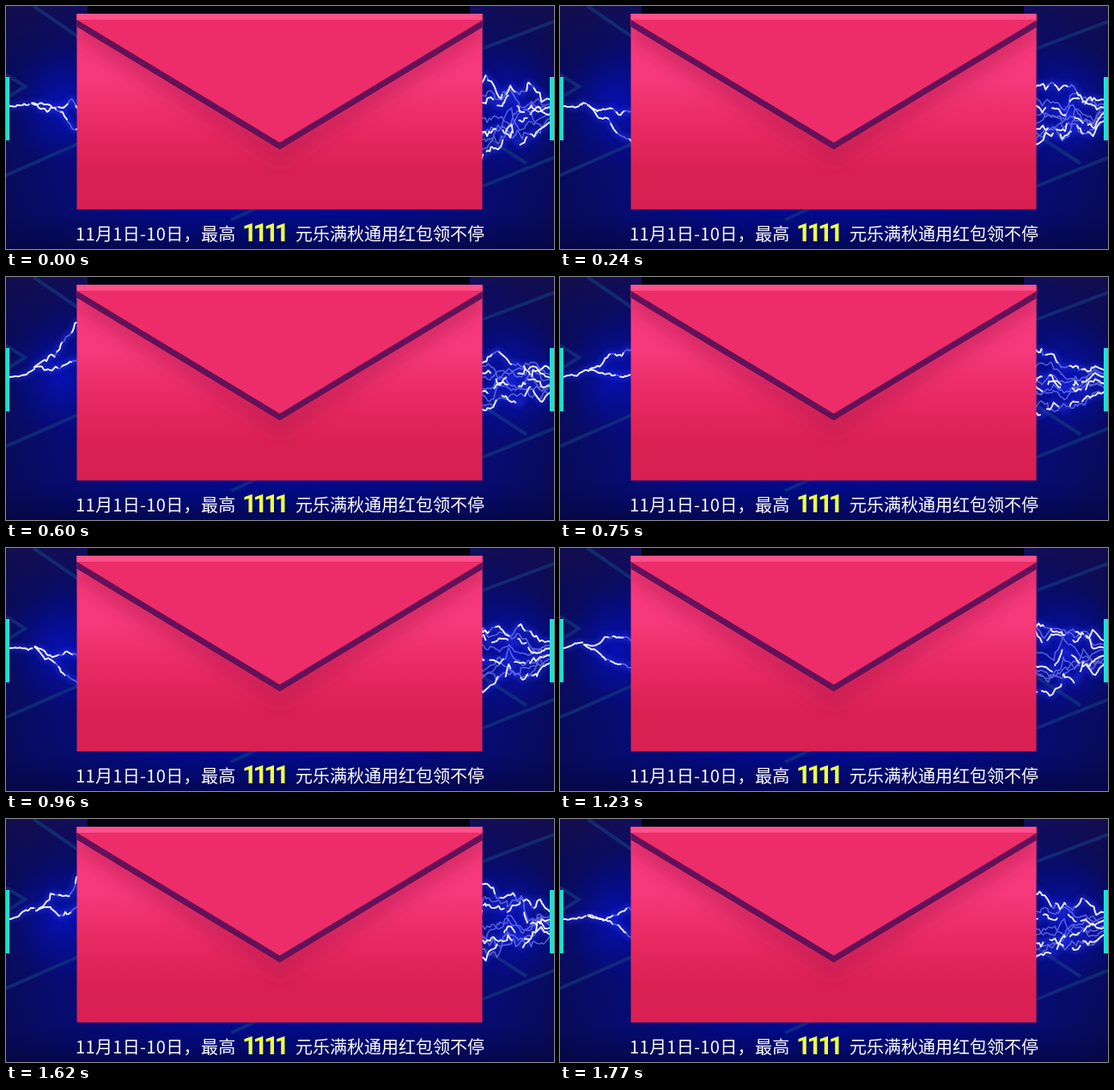
Animation, 638 px wide and 284 px high, one loop 1800 ms. Source, as an HTML page:

```html
<!DOCTYPE html>
<html lang="zh">
<head>
<meta charset="utf-8">
<style>
html, body { margin: 0; width: 100%; height: 100%; overflow: hidden; background: #070b45 }
svg { display: block; width: 638px; height: 284px }
text { font: 500 20px "Noto Sans CJK SC", "Noto Sans CJK", sans-serif; fill: #fff }
.date { letter-spacing: .35px }
.sum { font: 700 30px Roboto, sans-serif; letter-spacing: -4.6px; fill: #eeff46 }
.bolt path { fill: none; stroke-linejoin: round }
</style>
</head>
<body>
<svg viewBox="0 0 638 284">
  <defs>
    <radialGradient id="sky" gradientUnits="userSpaceOnUse" cx="319" cy="140" r="365">
      <stop stop-color="#00109c"/><stop offset=".45" stop-color="#020a8c"/>
      <stop offset=".72" stop-color="#070c72"/><stop offset="1" stop-color="#0a0b4c"/>
    </radialGradient>
    <linearGradient id="dusk" x2="0" y2="1">
      <stop stop-color="#1a1048" stop-opacity=".6"/><stop offset=".35" stop-color="#060650" stop-opacity="0"/>
      <stop offset=".85" stop-color="#030550" stop-opacity=".1"/><stop offset="1" stop-color="#040640" stop-opacity=".75"/>
    </linearGradient>
    <radialGradient id="halo">
      <stop stop-color="#0710b4"/><stop offset="1" stop-color="#050e90" stop-opacity="0"/>
    </radialGradient>
    <linearGradient id="body" x2="0" y2="1">
      <stop stop-color="#fb3e82"/><stop offset=".35" stop-color="#f43879"/>
      <stop offset=".58" stop-color="#e82a63"/><stop offset=".8" stop-color="#da2153"/>
      <stop offset="1" stop-color="#d82052"/>
    </linearGradient>
    <filter id="soft" x="-20%" y="-20%" width="140%" height="150%"><feGaussianBlur stdDeviation="9"/></filter>
    <filter id="glow" filterUnits="userSpaceOnUse" x="0" y="0" width="638" height="284"><feGaussianBlur stdDeviation="3"/></filter>
    <clipPath id="front"><path d="M82.5 9H554.6V237.7H82.5z"/></clipPath>
  </defs>
  <path fill="url(#sky)" d="M0 0H638V284H0z"/>
  <path fill="url(#dusk)" d="M0 0H638V284H0z"/>
  <ellipse cx="65" cy="118" rx="65" ry="75" fill="url(#halo)"/>
  <ellipse cx="590" cy="122" rx="70" ry="80" fill="url(#halo)"/>
  <path d="M32 0L84 36M0 80L22 94L0 108M0 198L84 161M262 250L292 236M554 50L638 18M554 211L638 177M554 150L606 184"
    fill="none" stroke="#143c80" stroke-width="4" opacity=".6"/>
  <g class="bolt">
    <path id="aura" stroke="#2a35f0" stroke-width="6" opacity=".55" filter="url(#glow)"/>
    <path id="rim" stroke="#8490ff" stroke-width="1.6" opacity=".6"/>
    <path id="core" stroke="#f4f5ff" stroke-width="1.8" stroke-dasharray="34 5 14 16 22 9"/>
  </g>
  <path fill="#1fdfd2" d="M0 83H4V157H0zM633 83H638V157H633z"/>
  <path fill="#02020c" d="M95 0H540V10H95z"/>
  <g clip-path="url(#front)">
    <path fill="url(#body)" d="M82 9H555V238H82z"/>
    <path d="M83 26L319 174L555 26" fill="none" stroke="#b81c50" stroke-width="22" opacity=".5" filter="url(#soft)"/>
    <path d="M75 15.7L318.7 163.7L563 15.7V9H75z" fill="#ec2d69"/>
    <path d="M75 15.7L318.7 163.7L563 15.7" fill="none" stroke="#631158" stroke-width="7"/>
    <path fill="#ff5089" d="M82 9H555V16H82z"/>
  </g>
  <text x="81" y="274" class="date">11月1日-10日，最高</text>
  <text x="275" y="274.5" class="sum">1111</text>
  <text x="337" y="274">元乐满秋通用红包领不停</text>
</svg>
<script>
const LOOP = 1800, STEP = 30, BEAT = 90;

const mix = (a, b, k) => a + (b - a) * k;
const hash = (a, b, c) => {
  const v = Math.sin(a * 127.1 + b * 311.7 + c * 74.7) * 43758.5453;
  return (v - Math.floor(v)) * 2 - 1;
};

// Jagged along u, drifting between random shapes as time passes
function noise(u, t, seed) {
  const i = Math.floor(u), beat = Math.floor(t / BEAT), count = LOOP / BEAT;
  const at = b => mix(hash(i, b % count, seed), hash(i + 1, b % count, seed), u - i);
  return mix(at(beat), at(beat + 1), t / BEAT - beat);
}

// A crooked line between two points; the jitter fades out at its start
function strand(x0, y0, x1, y1, t, seed, rough) {
  const n = Math.ceil(Math.abs(x1 - x0) / 2.5);
  let d = '';
  for (let i = 0; i <= n; i++) {
    const k = i / n, fade = Math.min(1, i / 6);
    const jag = noise(i / 5, t, seed) + .35 * noise(i / 2, t, seed + 1) + .2 * noise(i, t, seed + 2);
    const x = mix(x0, x1, k) + fade * 2.5 * noise(i / 2, t, seed + 3);
    d += (i ? 'L' : 'M') + x.toFixed(1) + ' ' + mix(y0, y1, k).toFixed(1) * 1;
    d = d.slice(0, d.lastIndexOf(' ') + 1) + (mix(y0, y1, k) + fade * rough * jag).toFixed(1);
  }
  return d;
}

// One trunk that forks; the whole fork swings up and down twice per loop
function leftBolt(t) {
  const swing = Math.cos((t - 150) / LOOP * 4 * Math.PI);
  const forkX = 34 + 8 * noise(0, t, 5), forkY = 111 + 5 * swing;
  const end = 113 + 36 * swing, gap = 20 + 8 * noise(0, t, 6);
  return strand(4, 117, forkX, forkY, t, 10, 5)
    + strand(forkX, forkY, 86, end - gap, t, 20, 9)
    + strand(forkX, forkY, 86, end + gap, t, 30, 9);
}

// A bundle fanning out from the right edge
function rightBolt(t, count) {
  let d = '';
  for (let n = 0; n < count; n++) {
    const y = mix(92, 156, n / (count - 1));
    d += strand(635, mix(y, 120, .6), 552, y + 14 * noise(0, t, 100 + n), t, 200 + n * 10, 14);
  }
  return d;
}

const [aura, rim, core] = ['aura', 'rim', 'core'].map(id => document.getElementById(id));

function draw(now) {
  const t = Math.floor(now % LOOP / STEP) * STEP;
  const left = leftBolt(t), bright = left + rightBolt(t, 4);
  aura.setAttribute('d', bright);
  core.setAttribute('d', bright);
  rim.setAttribute('d', left + rightBolt(t, 6));
}

let start;
function tick(now) {
  start ??= now;
  draw(now - start);
  requestAnimationFrame(tick);
}
draw(0);
requestAnimationFrame(tick);
</script>
</body>
</html>
```
